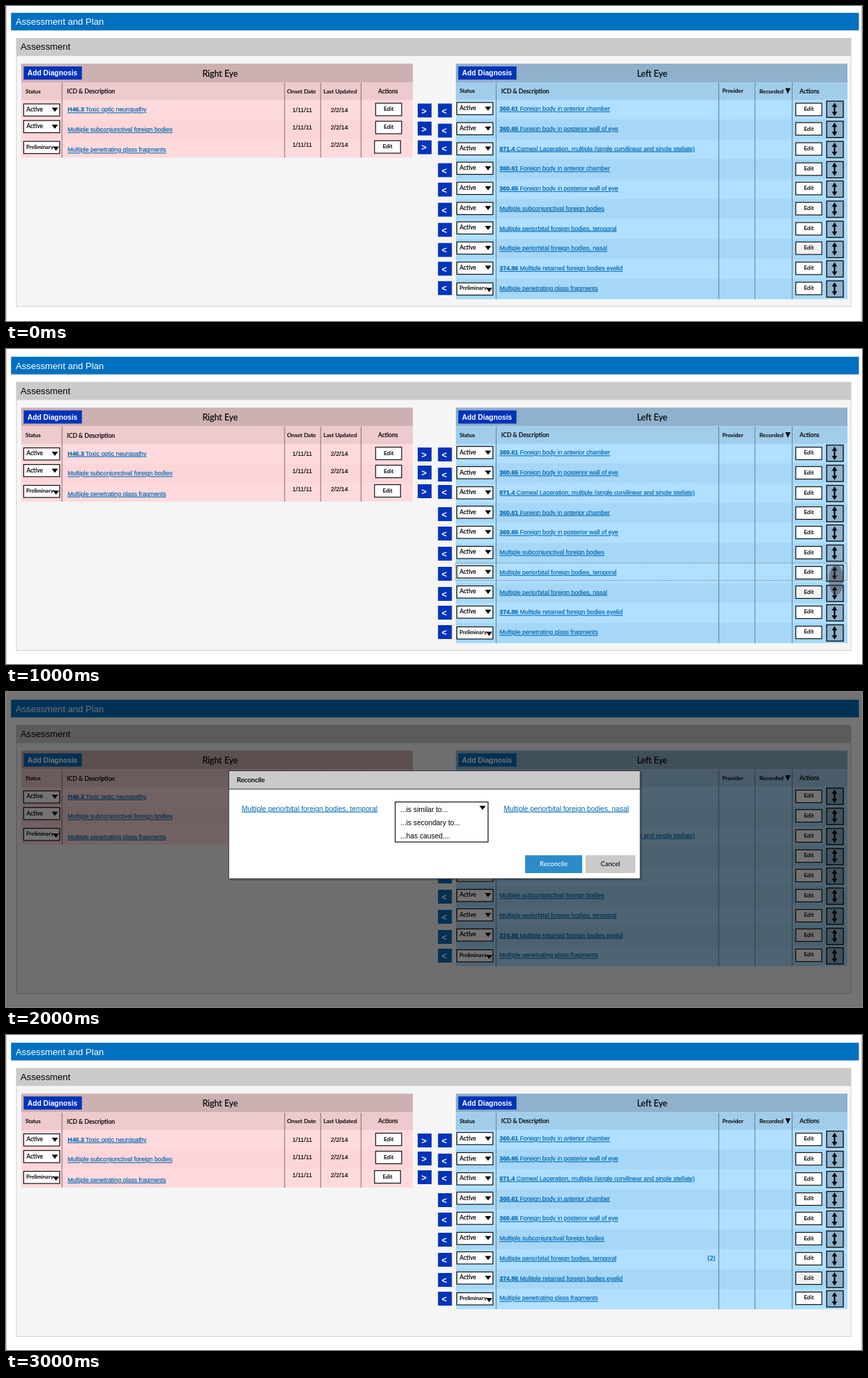
An HTML page that plays this animation: 1235 px wide and 454 px high, repeating every 4 s.

```html
<!DOCTYPE html>
<html lang="en">
<head>
<meta charset="utf-8">
<title>Assessment and Plan</title>
<style>
  html, body { margin: 0; width: 100%; height: 100%; overflow: hidden; background: #fff; }
  svg { display: block; position: absolute; left: 0; top: 0; }
  text { font-family: "Liberation Sans", Arial, Helvetica, sans-serif; white-space: pre; }
  .ui { font-family: Lato, "Gill Sans", sans-serif; font-weight: 500; stroke: #000; stroke-width: .18px; }
  .ui.light { stroke: none; }
  .ui.title { font-weight: 400; }
  .date { stroke: #000; stroke-width: .15px; }
  .link { text-decoration: underline; text-decoration-thickness: .8px; text-decoration-skip-ink: none; }
  .row { stroke: #0067b1; stroke-width: .18px; }
  .bold { font-weight: 700; }
</style>
</head>
<body>
<svg id="stage" width="1235" height="454" viewBox="0 0 1235 454"></svg>
<script>
const STEP = 1000, SCENES = 4;
const LINK = '#0067b1', GREY = '#cacaca', BAR = '#0070c0';
const PITCH = 28.75;

const findings = [
  ['360.61', ' Foreign body in anterior chamber'],
  ['360.65', ' Foreign body in posterior wall of eye'],
  ['871.4', ' Corneal Laceration, multiple (single curvilinear and single stellate)'],
  ['360.61', ' Foreign body in anterior chamber'],
  ['360.65', ' Foreign body in posterior wall of eye'],
  ['', 'Multiple subconjunctival foreign bodies'],
  ['', 'Multiple periorbital foreign bodies, temporal'],
  ['', 'Multiple periorbital foreign bodies, nasal'],
  ['374.86', ' Multiple retained foreign bodies eyelid'],
  ['', 'Multiple penetrating glass fragments']
];
const NASAL = 7;
const moveY = [152, 180.5, 206, 238, 266, 295, 324, 352.5, 380, 407.5];

const rect = (x, y, w, h, fill, extra = '') =>
  `<rect x="${x}" y="${y}" width="${w}" height="${h}" fill="${fill}" ${extra}/>`;
const frame = (x, y, w, h, fill = '#fff', line = 1.2) =>
  rect(x, y, w, h, fill, `stroke="#111" stroke-width="${line}"`);
// y is the optical middle of the line
const text = (x, y, size, body, { cls = '', fill = '#000', anchor = 'start' } = {}) =>
  `<text x="${x}" y="${(y + size * .35).toFixed(2)}" font-size="${size}" class="${cls}" fill="${fill}" text-anchor="${anchor}">${body}</text>`;
const ui = (x, y, size, body, anchor = 'start') => text(x, y, size, body, { cls: 'ui', anchor });
const vline = (x, y1, y2, color) => `<path d="M${x} ${y1}V${y2}" stroke="${color}" stroke-width="1.2"/>`;
const down = (x, y, w = 9, h = 6) =>
  `<path d="M${x - w / 2} ${y - h / 2}h${w}l${-w / 2} ${h}z"/>`;

function link(x, y, [code, label], size = 8.83, cls = 'link row') {
  const head = code ? `<tspan class="bold">${code}</tspan>` : '';
  return text(x, y, size, head + label, { cls, fill: LINK });
}

function select(x, y, prelim) {
  return frame(x, Math.round(y - 9) + .5, 52, 17.5) + (prelim
    ? ui(x + 3.8, y - .7, 7.9, 'Preliminary') + down(x + 46.6, y + 2)
    : ui(x + 4, y - .4, 8.5, 'Active') + down(x + 45, y + .2));
}

const edit = (x, y, fill) =>
  frame(x, Math.round(y - 9) + .5, 37.5, 18, fill) + ui(x + 18.8, y - .3, 8.2, 'Edit', 'middle');

function move(x, y, sign, fill) {
  return rect(x, Math.round(y - 10), 20, 20, fill) +
    text(x + 9, y + .6, 13, sign, { cls: 'bold', fill: '#fff', anchor: 'middle' });
}

function sorter(y) {
  return frame(1184, Math.round(y - 12) + .5, 24, 23.5, '#8fb3cf', 1.4) +
    `<path d="M1195.4 ${y - 9.6}l3.9 6h-2.8v7.2h2.8l-3.9 6l-3.9-6h2.8v-7.2h-2.8z"/>`;
}

function tableHead(x, title, titleX, fill, blue) {
  return rect(x, 84.5, 565, 27, fill) + rect(x + 3.5, 88.5, 84, 19, blue) +
    text(x + 45, 98, 10.3, 'Add Diagnosis', { cls: 'bold', fill: '#fff', anchor: 'middle' }) +
    text(titleX, 98.7, 12.4, title, { cls: 'ui title', anchor: 'middle' });
}

function rightEye(blue) {
  let s = tableHead(22, 'Right Eye', 309, '#cdb0b2', blue) +
    rect(22, 111.5, 565, 108.5, '#ffdadd') + rect(22, 111.5, 565, 25.5, '#edcacd') +
    rect(22, 166, 565, 27, '#fcd5d8');
  for (const x of [80.8, 402, 454, 512.3]) s += vline(x, 112, 220, '#937b7f');
  s += ui(28, 124.5, 8, 'Status') + ui(88, 124.5, 8.6, 'ICD &amp; Description') +
    ui(405.5, 124.5, 8.25, 'Onset Date') + ui(458, 124.5, 8.25, 'Last Updated') + ui(537, 124.5, 8.5, 'Actions');
  const rows = [
    ['H46.3', ' Toxic optic neuropathy', 150.8, 150.8, 151.2, 533.3, 150],
    ['', 'Multiple subconjunctival foreign bodies', 175.3, 179.4, 176.3, 533.3, 176],
    ['', 'Multiple penetrating glass fragments', 205, 208.8, 201.6, 531.7, 204]
  ];
  const date = { cls: 'date', anchor: 'middle' };
  rows.forEach(([code, label, selY, linkY, dateY, editX, editY], i) => {
    s += select(25.5, selY, i === 2) + link(89, linkY, [code, label]) +
      text(427.5, dateY, 8.9, '1/11/11', date) + text(481, dateY, 9, '2/2/14', date) +
      edit(editX, editY) + move(594, 152 + i * 26.3, '&gt;', blue);
  });
  return s;
}

function leftEye(rows, blue, count) {
  const end = 136.5 + PITCH * rows.length;
  let s = tableHead(649, 'Left Eye', 932.3, '#8fb1cb', blue) +
    rect(649, 111.5, 565, end - 111.5, '#b0dfff') + rect(649, 111.5, 565, 25, '#a1cdeb');
  for (let i = 1; i < rows.length; i += 2) s += rect(649, 136 + i * PITCH, 565, PITCH, '#a6d7f6');
  for (const x of [707.2, 1028.4, 1080.5, 1134.3]) s += vline(x, 112, end, '#6d8ca3');
  s += ui(654.5, 124, 8, 'Status') + ui(714.5, 124, 8.6, 'ICD &amp; Description') +
    ui(1033.5, 124, 8.1, 'Provider') + ui(1087, 124.3, 8.35, 'Recorded') + down(1128, 124, 7.5, 8) +
    ui(1145, 124, 8.5, 'Actions');
  rows.forEach((row, i) => {
    const last = i === rows.length - 1;
    s += select(650.5, 149.3 + i * 28.65 + (last ? 1.4 : 0), last) +
      link(712, 149.4 + i * PITCH, row) +
      edit(1139.5, 149.7 + i * 28.65, i === 7 ? '#f2f2f2' : '#fff') +
      sorter(150.4 + i * PITCH) + move(623.3, moveY[i], '&lt;', blue);
  });
  if (count) s += text(1017.7, 321.8, 10, '(2)', { cls: 'ui light bold', fill: LINK, anchor: 'middle' });
  return s;
}

function page(rows, { blue = '#0033b8', border = '#cfcfcf', count = false } = {}) {
  return rect(7.3, 11.2, 1223.2, 25.4, BAR) +
    text(14, 24, 13.15, 'Assessment and Plan', { fill: '#fff' }) +
    rect(15, 73, 1204, 361.5, '#f5f5f5', `stroke="${border}"`) +
    rect(14.5, 47.5, 1205, 25.5, GREY) + text(21, 60, 13.2, 'Assessment') +
    rightEye(blue) + leftEye(rows, blue, count);
}

const edge = x => rect(x, 0, 1, 454, '#d9b4bb');

function drag() {
  return rect(648.5, 308.5, 565, 25, 'none', 'stroke="#7a6f78" stroke-width=".9" stroke-dasharray="1.5"') +
    '<ellipse cx="1197.6" cy="333" rx="10.5" ry="22" fill="#333" fill-opacity=".42"/>';
}

function dialog() {
  const button = (x, w, fill, color, label) => rect(x, 235.3, w, 25.7, fill) +
    text(x + w / 2, 247.8, 9.5, label, { cls: 'ui light', fill: color, anchor: 'middle' });
  let s = rect(0, 0, 1235, 454, '#000', 'fill-opacity=".55"') +
    rect(322.5, 115, 595, 156.5, '#000', 'fill-opacity=".25"') +
    rect(321.5, 113.5, 593.5, 155.5, '#fff', 'stroke="#444"') +
    rect(321.5, 113.5, 593.5, 26.5, GREY, 'stroke="#333"') +
    ui(333, 126.3, 9.6, 'Reconcile') +
    link(340, 168, findings[6], 10.25, 'link') + link(718, 168, findings[NASAL], 10.25, 'link') +
    frame(561.5, 158.5, 134, 57.7) + down(687.5, 167);
  ['...is similar to...', '...is secondary to...', '...has caused....'].forEach((t, i) => {
    s += text(569, 169.3 + i * 18.9, 10.25, t);
  });
  return s + button(749, 82.3, '#2d8bca', '#fff', 'Reconcile') + button(836, 72, GREY, '#000', 'Cancel');
}

const merged = findings.filter((_, i) => i !== NASAL);
const scenes = [
  edge(0) + edge(1234) + `<g transform="translate(0 -1.4)">${page(findings)}</g>`,
  edge(0) + page(findings) + drag(),
  page(merged, { blue: '#0a6bb8', border: '#d8b8b8' }) + dialog(),
  edge(0) + edge(1234) + page(merged, { count: true })
];

const stage = document.getElementById('stage');
stage.innerHTML = scenes.map(s => `<g display="none">${s}</g>`).join('');
const layers = [...stage.children];
const start = performance.now();
let shown = -1;

function draw() {
  const now = Math.floor((performance.now() - start) / STEP) % SCENES;
  if (now !== shown) {
    layers.forEach((g, i) => g.setAttribute('display', i === now ? 'inline' : 'none'));
    shown = now;
  }
  requestAnimationFrame(draw);
}
draw();
</script>
</body>
</html>
```
